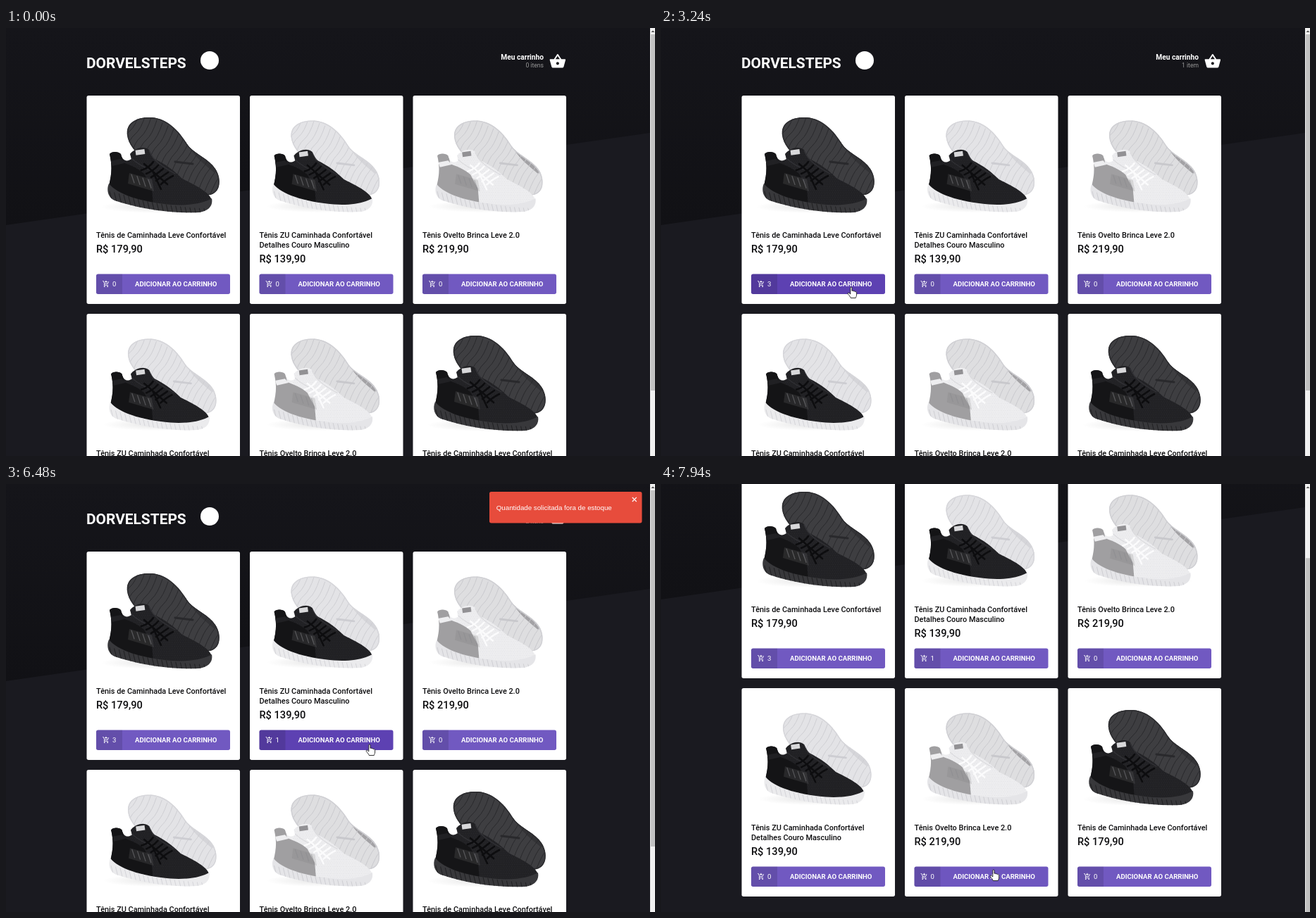
Animation, 921 px wide and 608 px high, one loop 8000 ms. Source, as an HTML page:

```html
<!DOCTYPE html>
<html lang="pt-BR">
<head>
<meta charset="utf-8">
<title>Loja de tênis</title>
<style>
  html, body { margin: 0; width: 100%; height: 100%; overflow: hidden; background: #1a1a20; }
  svg { display: block; width: 100vw; height: 100vh; font-family: Roboto, sans-serif; }
  .brand { font: 700 20.9px Roboto, sans-serif; }
  .strong { font: 700 9.6px Roboto, sans-serif; }
  .cart { font: 700 10.2px Roboto, sans-serif; }
  .small { font: 400 8.6px Roboto, sans-serif; }
  .title { font: 500 10.9px Roboto, sans-serif; }
  .price { font: 500 14.6px Roboto, sans-serif; }
  .count { font: 400 9.6px Roboto, sans-serif; }
  .alert { font: 400 9.74px "Liberation Sans", Arial, sans-serif; }
  .black { --back: #3e3e41; --rib: #29292c; --edge: #2d2d30; --upper: #212124; --dot: #323236; --heel: #151517; --sole: #38383b; --groove: #222224; --lace: #0d0d0f; --tag: #d8d8da; --patch: #333336; }
  .mixed { --back: #e3e3e6; --rib: #cdcdd2; --edge: #d6d6da; --upper: #202023; --dot: #313135; --heel: #141416; --sole: #ebebed; --groove: #d6d6da; --lace: #0d0d0f; --tag: #d8d8da; --patch: #d5d5d9; }
  .light { --back: #dedee0; --rib: #c8c8cc; --edge: #d0d0d4; --upper: #eeeef0; --dot: #dadadd; --heel: #a09fa1; --sole: #e5e5e8; --groove: #d0d0d4; --lace: #fbfbfc; --tag: #929194; --patch: #a3a2a5; }
</style>
</head>
<body>
<svg id="stage" viewBox="0 0 921 608" preserveAspectRatio="none"></svg>
<script>
const CART = 'M11 9h2V6h3V4h-3V1h-2v3H8v2h3v3zm-4 9c-1.1 0-1.99.9-1.99 2S5.9 22 7 22s2-.9 2-2-.9-2-2-2zm10 0c-1.1 0-1.99.9-1.99 2s.89 2 1.99 2 2-.9 2-2-.9-2-2-2zm-9.83-3.25l.03-.12.9-1.63h7.45c.75 0 1.41-.41 1.75-1.03l3.86-7.01L19.42 4h-.01l-1.1 2-2.76 5H8.53L4.27 2H1v2h2l3.6 7.59-1.35 2.45c-.16.28-.25.61-.25.96 0 1.1.9 2 2 2h12v-2H7.42c-.13 0-.25-.11-.25-.25z';
const BASKET = 'M17.21 9l-4.38-6.56c-.19-.28-.51-.42-.83-.42-.32 0-.64.14-.83.43L6.79 9H2c-.55 0-1 .45-1 1 0 .09.01.18.04.27l2.54 9.27c.23.84 1 1.46 1.92 1.46h13c.92 0 1.69-.62 1.93-1.46l2.54-9.27L23 10c0-.55-.45-1-1-1h-4.79zM9 9l3-4.4L15 9H9zm3 8c-1.1 0-2-.9-2-2s.9-2 2-2 2 .9 2 2-.9 2-2 2z';
const BACK = 'M172 152C170 134 186 126 207 127C230 129 246 147 257 165C264 176 282 183 293 195C302 205 304 215 302 225C299 235 291 239 279 237L235 222C210 195 175 178 172 152Z';
const UPPER = 'M147 179C150 175 159 175 163 179C165 188 171 191 178 186L176 179C183 170 196 167 203 173L209 185C228 194 240 204 250 214C270 224 290 234 292 245L270 253C220 257 170 246 146 224C150 208 151 196 147 179Z';
const SOLE = 'M146 221C158 236 190 247 235 251C262 253 282 248 292 242C294 252 288 260 274 262C235 264 190 257 154 245C145 241 142 230 146 221Z';

const repeat = (n, make) => Array.from({ length: n }, (_, i) => make(i)).join('');

const walker = 'Tênis de Caminhada Leve Confortável';
const products = {
  black: { lines: [walker], price: 'R$ 179,90' },
  mixed: { lines: ['Tênis ZU Caminhada Confortável', 'Detalhes Couro Masculino'], price: 'R$ 139,90' },
  light: { lines: ['Tênis Ovelto Brinca Leve 2.0'], price: 'R$ 219,90' },
};
const shelf = ['black', 'mixed', 'light', 'mixed', 'light', 'black'];

// Drawn in the coordinates of the first card; other cards are shifted.
function card(kind, i) {
  const { lines, price } = products[kind];
  const fit = kind === 'black' ? '' : 'translate(8 9.6) scale(.96)';
  return `<g transform="translate(${i % 3 * 231.5} ${Math.floor(i / 3) * 310})">
    <rect x="114.5" y="96" width="217.5" height="296" rx="2.7" fill="#fff"/>
    <use href="#shoe" class="${kind}" transform="${fit}"/>
    <g fill="#0c0c0e">
      ${lines.map((line, n) => `<text class="title" x="128" y="${297.5 + n * 14}">${line}</text>`).join('')}
      <text class="price" x="128" y="${304.5 + lines.length * 14}">${price}</text>
    </g>
    <g fill="#fff">
      <rect class="button" x="128" y="349.5" width="190" height="28.5" rx="2.7"/>
      <path d="M165 349.5H130.7a2.7 2.7 0 0 0-2.7 2.7v23.1a2.7 2.7 0 0 0 2.7 2.7H165Z" fill="#000" opacity=".12"/>
      <path d="${CART}" transform="translate(136.6 358.3) scale(.445)"/>
      <text class="count quantity" x="151" y="367.3">0</text>
      <text class="strong" x="241.2" y="367.2" text-anchor="middle">ADICIONAR AO CARRINHO</text>
    </g>
  </g>`;
}

const stage = document.getElementById('stage');
stage.innerHTML = `
<defs>
  <clipPath id="backClip"><path d="${BACK}"/></clipPath>
  <clipPath id="upperClip"><path d="${UPPER}"/></clipPath>
  <clipPath id="soleClip"><path d="${SOLE}"/></clipPath>
  <linearGradient id="night" x2="0" y2="1"><stop stop-color="#15151a"/><stop offset="1" stop-color="#111115"/></linearGradient>
  <radialGradient id="shadow"><stop stop-color="#999" stop-opacity=".25"/><stop offset="1" stop-color="#999" stop-opacity="0"/></radialGradient>
  <g id="shoe" fill="none" stroke-linecap="round" stroke-linejoin="round">
    <ellipse cx="215" cy="254" rx="80" ry="9" fill="url(#shadow)"/>
    <path d="${BACK}" style="fill:var(--back)"/>
    <g clip-path="url(#backClip)">
      <path d="M250 150C272 172 290 186 303 204L295 205C280 192 262 180 250 150Z" style="fill:var(--patch)"/>
      <g style="stroke:var(--rib)">
        ${repeat(19, i => `<path d="M${162 + i * 8} ${172 + i * 4}q${4 + i * .2} -18 13 -25t15 -28"/>`)}
        <path d="M240 190l25 3" stroke-width="3"/>
      </g>
      <path d="${BACK}" stroke-width="3" style="stroke:var(--edge)"/>
    </g>
    <path d="${UPPER}" style="fill:var(--upper)"/>
    <g clip-path="url(#upperClip)">
      <g stroke-width=".8" stroke-dasharray=".1 2.6" style="stroke:var(--dot)">
        ${repeat(30, i => `<path d="M${176 + i % 2 * 1.3} ${176 + i * 2.6}h120"/>`)}
      </g>
      <path d="M140 172L163 174L166 191C174 194 186 198 196 207L207 228L209 252L140 232Z" style="fill:var(--heel)"/>
      <path d="M148 189l15-3 5 6-17 4z" style="fill:var(--upper)"/>
      <path d="M175 206l32 9 3 17-37-11z" opacity=".2" fill="#777"/>
      ${repeat(4, i => `<path d="M${178 + i * 8} ${208 + i * 2.5}l4 12" stroke="#88888b" stroke-width="1.2" opacity=".5"/>`)}
    </g>
    <path d="M178 185C187 194 198 199 210 204M203 174C208 188 222 197 240 207" stroke-width="1.2" style="stroke:var(--dot)"/>
    <g stroke-width="2.6" style="stroke:var(--lace)">
      ${repeat(5, i => `<path d="M${192 + i * 7} ${202 + i * 5}Q${203 + i * 6} ${199 + i * 4} ${209 + i * 7} ${190 + i * 5}"/>`)}
      <path d="M196 193L229 222M208 203L220 229"/>
    </g>
    <rect x="184" y="173" width="13" height="7" transform="rotate(-8 190 177)" style="fill:var(--tag)"/>
    <path d="${SOLE}" style="fill:var(--sole)"/>
    <g clip-path="url(#soleClip)" stroke-width="1.1" style="stroke:var(--groove)">
      ${repeat(22, i => `<path d="M${147 + i * 6.7} ${232 + 25 * Math.sin(i / 14)}l4 16"/>`)}
    </g>
  </g>
</defs>
<rect width="921" height="608" fill="#1a1a20"/>
<g id="page">
  <path d="M0 0H921V148L0 280Z" fill="url(#night)"/>
  <g fill="#fff">
    <text class="brand" x="114" y="57.4">DORVELSTEPS</text>
    <circle cx="289" cy="46" r="13"/>
    <text class="cart" x="763" y="45" text-anchor="end">Meu carrinho</text>
    <text class="small" id="items" x="763" y="56" text-anchor="end" fill="#999"></text>
    <path d="${BASKET}" transform="translate(770.6 35) scale(1.02)"/>
  </g>
  ${shelf.map(card).join('')}
</g>
<g id="toast">
  <rect width="216.5" height="44.5" rx="2.7" fill="#e74c3c"/>
  <text class="alert" x="9.8" y="25.7" fill="#fff">Quantidade solicitada fora de estoque</text>
  <path d="M202.8 8l6 6m0-6l-6 6" stroke="#fff" stroke-width="1.1"/>
  <rect id="progress" y="41.2" width="216.5" height="3.3" fill="#fff" opacity=".75"/>
</g>
<g id="cursor" fill="#fff" stroke="#111" stroke-width=".85" stroke-linejoin="round">
  <path id="arrow" d="M0 0V11.5L2.7 9 4.6 13.2 6.5 12.4 4.7 8.3H8.2Z"/>
  <path id="hand" d="M-1.2 .9C-1.2-.4 1-.4 1 .9V5.5C1.2 4.8 3 4.9 3.2 6C4 5.4 5.3 5.7 5.5 6.8C6.4 6.3 7.6 6.8 7.6 8V11C7.6 13 6.5 14 6.3 15.5H-.8C-1 14-3 12-4.8 9.6C-5.3 8.3-3.8 7.6-2.6 8.8L-1.2 10Z"/>
</g>
<rect x="914" width="7" height="608" fill="#f1f1f1"/>
<path d="M915.5 6L918 3.5 920.5 6Z" fill="#505050"/>
<rect id="thumb" x="915" y="9" width="6" height="506" fill="#c1c1c1"/>`;

const byId = id => document.getElementById(id);
const buttons = stage.querySelectorAll('.button');
const quantities = stage.querySelectorAll('.quantity');
const [page, items, toast, progress, cursor, arrow, hand, thumb] =
  ['page', 'items', 'toast', 'progress', 'cursor', 'arrow', 'hand', 'thumb'].map(byId);

const LOOP = 8000;
const clamp = x => Math.max(0, Math.min(1, x));
const linear = x => x;
const smooth = x => x * x * (3 - 2 * x);
const easeOut = x => 1 - (1 - x) ** 3;
const mix = (a, b, k) => a + (b - a) * k;

// Keys are [time, ...values].
function track(t, keys, ease) {
  const next = keys.findIndex(key => key[0] > t);
  if (next === 0) return keys[0].slice(1);
  if (next < 0) return keys[keys.length - 1].slice(1);
  const a = keys[next - 1], b = keys[next];
  const k = ease((t - a[0]) / (b[0] - a[0]));
  return a.slice(1).map((v, i) => mix(v, b[i + 1], k));
}

const pointer = [
  [70, 893, 598], [270, 509, 275], [730, 509, 275], [1430, 263, 371], [1980, 263, 371],
  [2030, 269, 370], [2310, 270, 368], [4420, 270, 368], [5220, 516, 370], [6480, 516, 370],
  [6850, 624, 367], [6900, 624, 367], [7050, 627, 370], [7150, 627, 370], [7780, 491, 513], [7940, 472, 548],
];
const scrolling = [[6840, 0], [6890, 4], [7050, 101], [7180, 116]];
const toastIn = [[3374, 2000], [3794, -16.7], [3899, 6.7], [4004, -3.3], [4074, 0]];
const toastOut = [[6460, 0], [6610, -13.3], [7100, 1333]];
const hovers = { 0: [1200, 4640], 1: [4745, 6615], 2: [6710, 6900], 4: [7925, LOOP] };
const additions = { 0: [2030, 2310, 2710], 1: [5740] };

function draw(t) {
  const [scroll] = track(t, scrolling, linear);
  page.setAttribute('transform', `translate(0 ${-scroll})`);
  thumb.setAttribute('y', 9 + scroll * .83);

  let pressing = false;
  buttons.forEach((button, i) => {
    const [from, to] = hovers[i] || [LOOP, LOOP];
    const k = clamp((t - from) / 120) - clamp((t - to) / 120);
    const [r, g, b] = [mix(113, 93, k), mix(89, 65, k), mix(193, 178, k)].map(Math.round);
    button.setAttribute('fill', `rgb(${r},${g},${b})`);
    pressing ||= t >= from && t < to;
  });
  quantities.forEach((label, i) => {
    label.textContent = (additions[i] || []).filter(time => t >= time).length;
  });
  const kinds = Object.values(additions).filter(times => t >= times[0]).length;
  items.textContent = kinds === 1 ? '1 item' : `${kinds} itens`;

  const [shift] = t < 6460 ? track(t, toastIn, easeOut) : track(t, toastOut, smooth);
  toast.setAttribute('transform', `translate(${686.7 + shift} 11)`);
  toast.setAttribute('opacity', clamp((t - 3374) / 380) * (1 - clamp((t - 6610) / 490)));
  progress.setAttribute('width', 216.5 * (1 - clamp((t - 3374) / 3050)));

  const [x, y] = track(t, pointer, smooth);
  cursor.setAttribute('transform', `translate(${x} ${y})`);
  cursor.setAttribute('visibility', t < 70 ? 'hidden' : 'visible');
  arrow.setAttribute('opacity', pressing ? 0 : 1);
  hand.setAttribute('opacity', pressing ? 1 : 0);
}

const start = performance.now();
function tick() {
  draw((performance.now() - start) % LOOP);
  requestAnimationFrame(tick);
}
tick();
</script>
</body>
</html>
```
